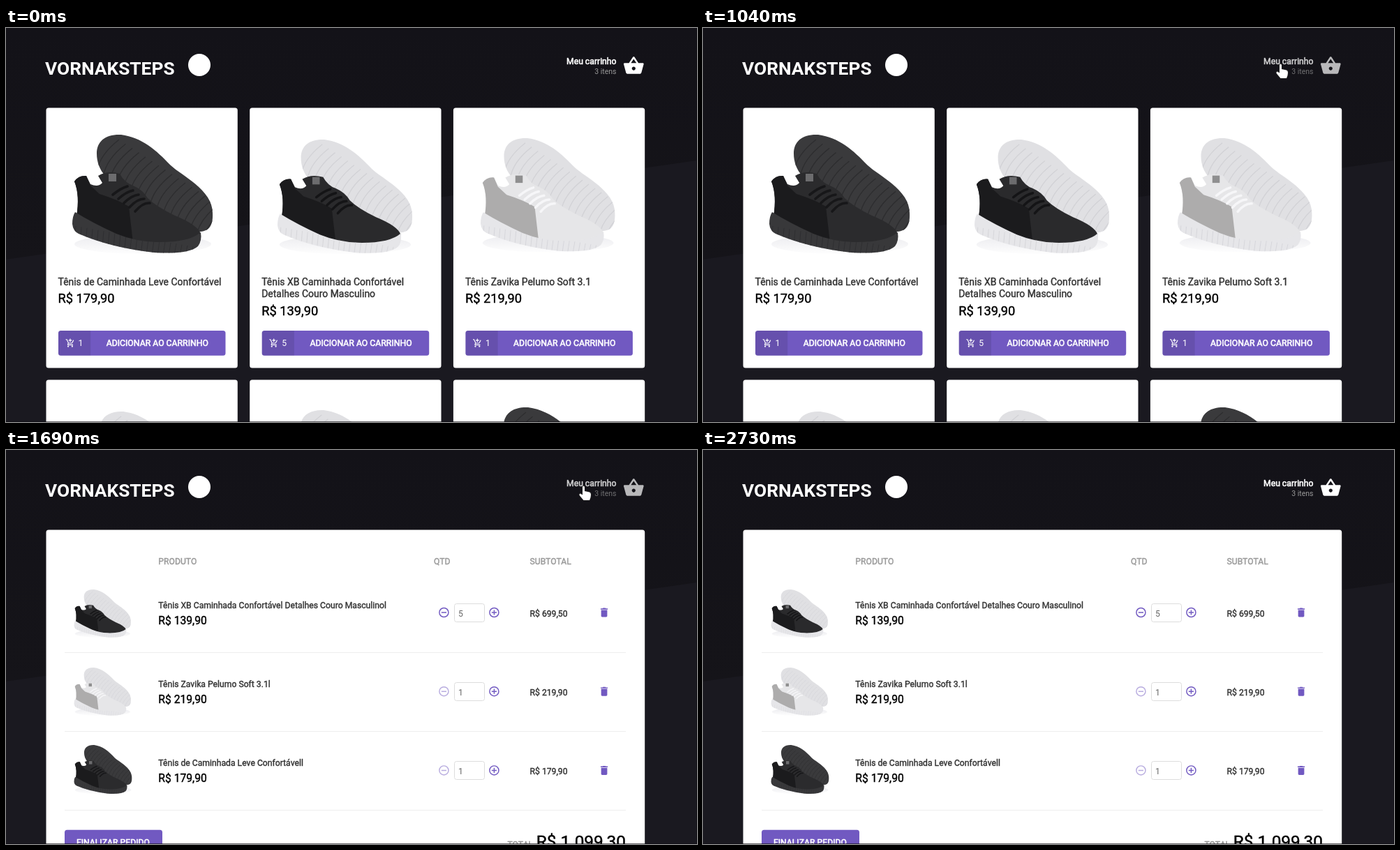
An HTML page with a canvas for the animation above (3.9 s loop, 990 by 565 pixels).

```html
<!DOCTYPE html>
<html lang="pt-BR">
<head>
<meta charset="utf-8">
<title>Loja de tênis</title>
<style>
html, body { margin: 0; width: 100%; height: 100%; overflow: hidden; background: #16151b; }
canvas { display: block; width: 990px; height: 565px; }
</style>
</head>
<body>
<canvas id="stage" width="990" height="565"></canvas>
<script>
const ctx = document.getElementById('stage').getContext('2d');
const W = 990, H = 565, LOOP = 3900;
const FONT = 'Roboto, Arial, sans-serif';
const PURPLE = '#7159c1';

const basket = new Path2D('M17.21 9l-4.38-6.56c-.19-.28-.51-.42-.83-.42-.32 0-.64.14-.83.43L6.79 9H2c-.55 0-1 .45-1 1 0 .09.01.18.04.27l2.54 9.27c.23.84 1 1.46 1.92 1.46h13c.92 0 1.69-.62 1.93-1.46l2.54-9.27L23 10c0-.55-.45-1-1-1h-4.79zM9 9l3-4.4L15 9H9zm3 8c-1.1 0-2-.9-2-2s.9-2 2-2 2 .9 2 2-.9 2-2 2z');
const addCart = new Path2D('M11 9h2V6h3V4h-3V1h-2v3H8v2h3v3zm-4 9c-1.1 0-1.99.9-1.99 2S5.9 22 7 22s2-.9 2-2-.9-2-2-2zm10 0c-1.1 0-1.99.9-1.99 2s.89 2 1.99 2 2-.9 2-2-.9-2-2-2zm-9.83-3.25l.03-.12.9-1.63h7.45c.75 0 1.41-.41 1.75-1.03l3.86-7.01L19.42 4h-.01l-1.1 2-2.76 5H8.53l-.13-.27L6.16 6l-.95-2-.94-2H1v2h2l3.6 7.59-1.35 2.45c-.16.28-.25.61-.25.96 0 1.1.9 2 2 2h12v-2H7.42c-.13 0-.25-.11-.25-.25z');
const trash = new Path2D('M6 19c0 1.1.9 2 2 2h8c1.1 0 2-.9 2-2V7H6v12zM19 4h-3.5l-1-1h-5l-1 1H5v2h14V4z');
const arrow = new Path2D('M0 0V14.5L3.4 11.4L5.8 16.6L8.3 15.5L6 10.5H10.4Z');
const hand = new Path2D('M-3 -8Q-1.5 -11 0 -8V-2L7 -.5Q9 0 9 3Q9 7 7 11H-1.5L-7 4.5Q-8.5 2 -6 1.5L-3 3.5Z');

const shoe = {
  back: new Path2D('M130 180C130 162 143 152 165 153C195 157 215 175 236 197C252 212 296 232 296 265C297 285 290 292 276 292L200 270L142 212C134 203 130 192 130 180Z'),
  upper: new Path2D('M98 220Q104 211 115 212L121 224Q132 229 138 222L132 212Q145 204 163 209Q170 222 182 226Q196 232 203 244Q215 256 242 269Q274 282 279 295L270 310H190L101 270Q106 240 98 220Z'),
  heel: new Path2D('M98 220Q104 211 115 212L121 226L134 238Q160 246 176 256L182 308L101 270Q106 240 98 220Z'),
  mid: new Path2D('M99 264Q95 270 95 281Q96 291 104 295Q150 315 212 322Q262 325 275 313Q281 305 279 293Q262 308 215 307Q185 306 158 295Q125 280 99 264Z')
};
const BLACK = { back: '#3a3a3c', groove: '#2d2d2f', upper: '#2b2b2d', heel: '#1b1b1d', mid: '#38383a', lace: '#171719', tag: '#6c6c6e' };
const MIXED = { back: '#e0e0e3', groove: '#d2d2d6', upper: '#2a2a2c', heel: '#1b1b1d', mid: '#e6e6e9', lace: '#141416', tag: '#6c6c6e' };
const WHITE = { back: '#e0e0e3', groove: '#d2d2d6', upper: '#e6e6e8', heel: '#adacac', mid: '#e6e6e9', lace: '#f6f6f8', tag: '#8f8f90' };

const items = [
  { lines: ['Tênis de Caminhada Leve Confortável'], price: 'R$ 179,90', qty: 1, sub: 'R$ 179,90', look: BLACK },
  { lines: ['Tênis XB Caminhada Confortável', 'Detalhes Couro Masculino'], price: 'R$ 139,90', qty: 5, sub: 'R$ 699,50', look: MIXED },
  { lines: ['Tênis Zavika Pelumo Soft 3.1'], price: 'R$ 219,90', qty: 1, sub: 'R$ 219,90', look: WHITE }
];

function text(s, x, y, size, color, { bold = 0.4, weight = 400, align = 'left' } = {}) {
  ctx.font = `${weight} ${size}px ${FONT}`;
  ctx.textAlign = align;
  ctx.fillStyle = ctx.strokeStyle = color;
  ctx.fillText(s, x, y);
  if (bold) {
    ctx.lineWidth = bold;
    ctx.lineJoin = 'round';
    ctx.strokeText(s, x, y);
  }
}

function box(x, y, w, h, color, r = 3.5) {
  ctx.fillStyle = color;
  ctx.beginPath();
  ctx.roundRect(x, y, w, h, r);
  ctx.fill();
}

function icon(path, x, y, scale, color) {
  ctx.save();
  ctx.translate(x, y);
  ctx.scale(scale, scale);
  ctx.fillStyle = color;
  ctx.fill(path, 'evenodd');
  ctx.restore();
}

function drawShoe(look, x, y, scale) {
  const part = name => { ctx.fillStyle = look[name]; ctx.fill(shoe[name]); };
  ctx.save();
  ctx.translate(x, y);
  ctx.scale(scale, scale);
  ctx.translate(-95, -153);

  const shade = ctx.createLinearGradient(0, 300, 0, 326);
  shade.addColorStop(0, '#eeeef1');
  shade.addColorStop(1, '#ffffff');
  ctx.fillStyle = shade;
  ctx.beginPath();
  ctx.ellipse(196, 310, 98, 14, 0, 0, 7);
  ctx.fill();

  part('back');
  ctx.save();
  ctx.clip(shoe.back);
  ctx.strokeStyle = look.groove;
  ctx.lineWidth = 1.4;
  for (let i = 0; i < 17; i++) {
    const gx = 136 + i * 9.5, gy = 192 + i * 6.2;
    ctx.beginPath();
    ctx.moveTo(gx - 6, gy + 14);
    ctx.quadraticCurveTo(gx - 2, gy - 10, gx + 26, gy - 32);
    ctx.stroke();
  }
  ctx.restore();

  part('upper');
  part('heel');
  part('mid');

  ctx.strokeStyle = look.groove;
  ctx.lineWidth = 0.8;
  ctx.save();
  ctx.clip(shoe.mid);
  for (let i = 0; i < 22; i++) {
    ctx.beginPath();
    ctx.moveTo(100 + i * 8, 284 + i * 1.4);
    ctx.lineTo(97 + i * 8, 326);
    ctx.stroke();
  }
  ctx.restore();

  ctx.strokeStyle = look.lace;
  ctx.lineWidth = 3.6;
  ctx.lineCap = 'round';
  for (let i = 0; i < 5; i++) {
    ctx.beginPath();
    ctx.moveTo(153 + i * 8, 239 + i * 6);
    ctx.quadraticCurveTo(164 + i * 8, 230 + i * 5, 174 + i * 8, 227 + i * 6);
    ctx.stroke();
  }
  ctx.fillStyle = look.tag;
  ctx.fillRect(147, 209, 11, 11);
  ctx.restore();
}

function background(flat) {
  ctx.fillStyle = '#1a1920';
  ctx.fillRect(0, 0, W, H);
  if (flat) return;
  const g = ctx.createLinearGradient(0, 0, 0, 330);
  g.addColorStop(0, '#131218');
  g.addColorStop(1, '#151419');
  ctx.fillStyle = g;
  ctx.beginPath();
  ctx.moveTo(0, 0);
  ctx.lineTo(W, 0);
  ctx.lineTo(W, 190);
  ctx.lineTo(0, 332);
  ctx.fill();
}

function header(alpha) {
  text('VORNAKSTEPS', 56, 67, 26.3, '#fff', { bold: 0, weight: 700 });
  ctx.fillStyle = '#fff';
  ctx.beginPath();
  ctx.arc(277, 53, 16, 0, 7);
  ctx.fill();
  ctx.globalAlpha = alpha;
  text('Meu carrinho', 874.5, 51.5, 12.2, '#fff', { bold: 0.6, align: 'right' });
  text('3 itens', 874.5, 66, 10.5, '#999', { bold: 0, align: 'right' });
  icon(basket, 883.6, 38.4, 1.308, '#fff');
  ctx.globalAlpha = 1;
}

function shop() {
  items.forEach((item, i) => {
    const x = 57.5 + i * 291.7;
    box(x, 114.5, 274.3, 373, '#fff');
    box(x, 504.5, 274.3, 80, '#fff');
    item.lines.forEach((line, n) => text(line, x + 17, 369 + n * 17.4, 13.95, '#333'));
    text(item.price, x + 17, 376.8 + item.lines.length * 17.4, 18.3, '#000');
    box(x + 17.5, 434, 239.5, 35.7, PURPLE);
    box(x + 17.5, 434, 46.2, 35.7, 'rgba(0,0,0,.1)', [3.5, 0, 0, 3.5]);
    icon(addCart, x + 27.5, 445, 0.581, '#fff');
    text(item.qty, x + 46, 456.3, 12.2, '#fff', { bold: 0 });
    text('ADICIONAR AO CARRINHO', x + 86.2, 456.4, 12.25, '#fff', { bold: 0.6 });
  });
  drawShoe(BLACK, 95, 153, 1);
  drawShoe(MIXED, 389, 160, 0.96);
  drawShoe(WHITE, 680, 158, 0.957);
  drawShoe(WHITE, 101, 550, 0.957);
  drawShoe(WHITE, 388, 548, 0.96);
  drawShoe(BLACK, 678, 544, 1);
}

function circleButton(x, y, plus, color) {
  ctx.strokeStyle = color;
  ctx.lineWidth = 1.45;
  ctx.lineCap = 'butt';
  ctx.beginPath();
  ctx.arc(x, y, 6.55, 0, 7);
  ctx.moveTo(x - 3.6, y);
  ctx.lineTo(x + 3.6, y);
  if (plus) {
    ctx.moveTo(x, y - 3.6);
    ctx.lineTo(x, y + 3.6);
  }
  ctx.stroke();
}

function cart(loaded) {
  const [name, qty, sub, del] = loaded ? [218.3, 613, 750.5, 857] : [122.8, 573, 729.8, 849];
  box(57.5, 114.5, 857.7, 480, '#fff');
  text('PRODUTO', name, 164, 12.2, '#999');
  text('QTD', qty, 164, 12.2, '#999');
  text('SUBTOTAL', sub, 164, 12.2, '#999');

  [items[1], items[2], items[0]].forEach((item, i) => {
    const y = 233 + i * 113.2;
    if (loaded) drawShoe(item.look, 97.5, [200, 312, 423][i], i < 2 ? 0.405 : 0.412);
    text(item.lines.join(' ') + 'l', name, y - 6, 12.2, '#333');
    text(item.price, name, y + 16.5, 15.7, '#000');
    circleButton(qty + 14.4, y, false, item.qty > 1 ? PURPLE : '#b8acdf');
    circleButton(qty + 86.4, y, true, PURPLE);
    ctx.strokeStyle = '#ddd';
    ctx.lineWidth = 1;
    ctx.beginPath();
    ctx.roundRect(qty + 29.5, Math.round(y) - 12.5, 43, 26, 3);
    ctx.stroke();
    text(item.qty, qty + 35, y + 5.5, 12.2, '#666', { bold: 0 });
    text(item.sub, sub, y + 5.5, 12.2, '#333');
    icon(trash, del - 8.7, y - 8.7, 0.727, PURPLE);
    ctx.fillStyle = '#eee';
    ctx.fillRect(84, Math.round(y + 57), 804, 1);
  });

  box(84, 544.7, 140, 40, PURPLE);
  text('FINALIZAR PEDIDO', 101, 566.6, 12.2, '#fff', { bold: 0.6 });
  text('TOTAL', 718.5, 570, 12.2, '#999');
  text('R$ 1.099,30', 888, 570, 24.4, '#000', { align: 'right' });
}

function pointer(path, x, y) {
  ctx.save();
  ctx.translate(x, y);
  ctx.lineJoin = 'round';
  ctx.lineWidth = 1.4;
  ctx.strokeStyle = '#222';
  ctx.stroke(path);
  ctx.fillStyle = '#fff';
  ctx.fill(path);
  ctx.restore();
}

// start time, link opacity, cursor shape, cursor x, cursor y
const steps = [
  [0, 1],
  [520, 1, arrow, 847, 18.5],
  [650, 0.88, hand, 836, 49],
  [780, 0.7, hand, 829, 61],
  [2340, 0.79, arrow, 715.5, 45],
  [2470, 0.93, arrow, 390, 70],
  [2600, 1, arrow, 46, 110],
  [2730, 1]
];

function render(t) {
  const [, alpha, shape, x, y] = steps.filter(s => s[0] <= t).pop();
  background(t >= 1170 && t < 1300);
  header(alpha);
  if (t < 1170) shop();
  else cart(t >= 1300);
  if (shape) pointer(shape, x, y);
  ctx.fillStyle = 'rgba(14,13,18,.6)';
  ctx.fillRect(0, H - 1, W, 1);
  ctx.fillRect(W - 1, 0, 1, H);
}

const start = performance.now();
function tick() {
  render(Math.max(0, performance.now() - start) % LOOP);
  requestAnimationFrame(tick);
}
tick();
</script>
</body>
</html>
```
